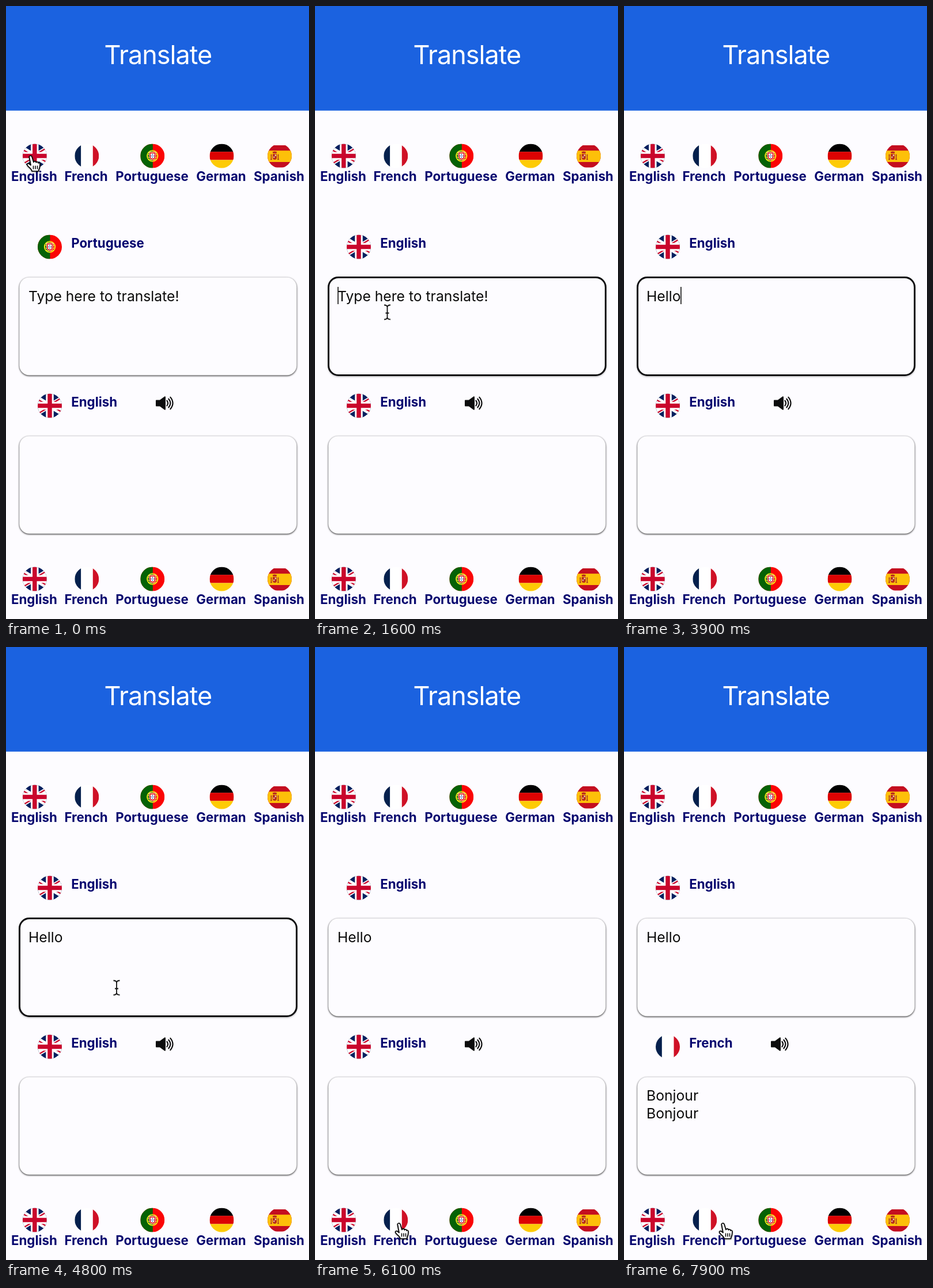
These frames come from a looping animation (526 px wide and 1065 px high, 8 s). An HTML page:

```html
<!DOCTYPE html>
<html lang="en">
<head>
<meta charset="utf-8">
<title>Translate</title>
<style>
  html, body { margin: 0; width: 100%; height: 100%; overflow: hidden; background: #fdfcff; }
  svg { display: block; width: 526px; height: 1065px; font-family: Inter, "Open Sans", sans-serif; }
  .title { font-size: 45px; letter-spacing: -1px; fill: #fff; }
  .label { font-size: 22.3px; font-weight: 700; fill: #06066f; }
  .body { font-size: 24.7px; fill: #0b0b0b; }
  .box { fill: #fdfcff; filter: drop-shadow(0 1.1px 1.4px rgba(0, 0, 0, .9)); }
  .ring { fill: #fdfcff; stroke: #0d0d0f; stroke-width: 3; filter: drop-shadow(0 2px 1px rgba(0, 0, 0, .18)); }
</style>
</head>
<body>
<svg viewBox="0 0 526 1065">
  <defs>
    <clipPath id="disc"><circle r="21"/></clipPath>
    <clipPath id="flat"><path d="M-21-18.500H21V20H-21Z"/></clipPath>

    <g id="English" clip-path="url(#disc)">
      <path fill="#04205f" d="M-21-21h42v42h-42z"/>
      <path stroke="#fff" stroke-width="8.500" d="M-35-21 35 21M-35 21 35-21"/>
      <path stroke="#c9062c" stroke-width="2.400" d="M-35-19.500 0 1.500M35 19.500 0-1.500M-35 22.500 0 1.500M35-22.500 0-1.500"/>
      <path stroke="#fff" stroke-width="13.500" d="M0-21V21M-21 0H21"/>
      <path stroke="#c9062c" stroke-width="7.500" d="M0-21V21M-21 0H21"/>
    </g>
    <g id="French" clip-path="url(#disc)">
      <path fill="#fff" d="M-21-21h42v42h-42z"/>
      <path fill="#05204d" d="M-21-21h10.800v42h-10.800z"/>
      <path fill="#cf1126" d="M10.500-21h10.500v42h-10.500z"/>
    </g>
    <g id="Portuguese" clip-path="url(#disc)">
      <path fill="#fb0405" d="M-21-21h42v42h-42z"/>
      <path fill="#056205" d="M-21-21h21.500v42h-21.500z"/>
      <g fill="none" stroke="#f4e51c" stroke-width="1.200">
        <circle r="9.300" stroke-width="1.700"/>
        <ellipse rx="9" ry="3.800"/>
        <path d="M-8-5Q0-9 8-5M-8 5Q0 9 8 5"/>
      </g>
      <path fill="#e31318" stroke="#fff" stroke-width=".8" d="M-5.500-6.500h11v7.500a5.500 5.800 0 0 1-11 0z"/>
      <path fill="#fff" d="M-3.400-4.200h6.800v5a3.400 3.600 0 0 1-6.800 0z"/>
      <path stroke="#143f9a" stroke-width="1.400" d="M0-3.300v1.500M0-.7v1.500M0 2v1.500M-2.400-.7v1.500M2.400-.7v1.500"/>
    </g>
    <g id="German" clip-path="url(#disc)">
      <path d="M-21-21h42v14h-42z"/>
      <path fill="#dc0303" d="M-21-7.200h42v14.200h-42z"/>
      <path fill="#fdcb05" d="M-21 6.900h42v14.500h-42z"/>
    </g>
    <g id="Spanish" clip-path="url(#disc)">
      <g clip-path="url(#flat)">
        <path fill="#c40e20" d="M-21-21h42v42h-42z"/>
        <path fill="#fdc009" d="M-21-9.300h42v19.800h-42z"/>
        <path stroke="#ad3b20" stroke-width="1.600" d="M-14.500-3v9M-2.500-3v9M-16 6h3M-4 6h3M-15.500-1h2M-3.500-1h2"/>
        <path fill="#b92c1d" d="M-12-3.500h7v6.500a3.500 3.500 0 0 1-7 0zM-11.500-4.500l-.8-2.500 3.800-1 3.800 1-.8 2.500z"/>
        <path fill="#e8c9a9" d="M-8.200-2.500h2.300v2.800h-2.300zM-11 1h2.300v2.300h-2.300z"/>
      </g>
    </g>

    <g id="speaker">
      <path fill="#0c0c0d" d="M0 7.500Q0 6.500 1 6.500H7L15.500 .3Q17 0 17 1.500V22.500Q17 24 15.500 23.700L7 17.500H1Q0 17.500 0 16.500Z"/>
      <path fill="none" stroke="#0c0c0d" stroke-width="2.100" stroke-linecap="round" d="M19.300 7.500Q23 12 19.300 16.500M22.300 4.500Q28.500 12 22.300 19.500M25.300 1.700Q33.800 12 25.300 22.300"/>
    </g>

    <g id="hand" style="filter:drop-shadow(0 1.500px 1px rgba(0,0,0,.4))">
      <path fill="#fff" stroke="#000" stroke-width="1.700" stroke-linejoin="round" d="M-2.500 1C-3.500-2 1-3 2 0L5 9.500C5.500 7 9 7 9.200 10C10 8 13 8.500 13 11C14 9.700 16.300 10.500 16 13.500L15.500 18C15 21 13.500 22 13.500 25H2C1.500 21-3 19-5.500 15.500C-8 12.500-5 10.500-2.500 12.500L0 14.500Z"/>
      <path stroke="#000" stroke-width="1.500" d="M4.500 15.500v6M8 15.500v6M11.500 15.500v6"/>
    </g>
    <path id="beam" fill="none" stroke="#111" stroke-width="1.800" d="M-5.500-12.500Q0-12.500 0-8.500Q0-12.500 5.500-12.500M0-9V9M-5.500 12.500Q0 12.500 0 8.500Q0 12.500 5.500 12.500M-3 1.500H3"/>
    <path id="arrow" stroke="#fff" stroke-width="1.600" d="M0 0V21L5 16.500L8.500 24.500L12 23L8.500 15.300H15Z"/>
  </defs>

  <path fill="#fdfcff" d="M0 0h526v1065H0z"/>
  <path fill="#1b62e0" d="M0 0h526v181.700H0z"/>
  <text class="title" x="170.500" y="100.500">Translate</text>
  <g id="rows"></g>

  <use id="fromFlag" x="76" y="418.500"/>
  <text id="fromName" class="label" x="113.200" y="419.500"></text>
  <rect id="idle" class="box" x="23.300" y="471.500" width="481.200" height="170" rx="17"/>
  <rect id="focus" class="ring" x="23.500" y="471.500" width="481" height="170" rx="17"/>
  <text id="input" class="body" x="39" y="512.500"></text>
  <path id="caret" stroke="#111" stroke-width="1.600" d="M0 488V518"/>

  <use id="toFlag" x="76" y="694.500"/>
  <text id="toName" class="label" x="113.200" y="695.500"></text>
  <use id="sound" href="#speaker" y="678"/>
  <rect class="box" x="23.300" y="747.300" width="481.200" height="169.500" rx="17"/>
  <text id="out1" class="body" x="39" y="788"></text>
  <text id="out2" class="body" x="39" y="818.500"></text>

  <use id="pointer"/>
</svg>
<script>
const $ = id => document.getElementById(id);
const LOOP = 8000, STEP = 100;
const FOCUS = 1400, BLUR = 5900;

// name, flag centre, label start
const langs = [
  ["English", 49.800, 8.900], ["French", 140.300, 101.400], ["Portuguese", 254.300, 190.200],
  ["German", 374.500, 330.300], ["Spanish", 475, 429.900]
];
$("rows").innerHTML = [0, 735].map(dy => langs.map(([name, cx, tx]) =>
  `<use href="#${name}" x="${cx}" y="${260.5 + dy}"/>` +
  `<text class="label" x="${tx}" y="${303.5 + dy}">${name}</text>`).join("")).join("");

// time, x, y of the pointer hot spot
const path = [
  [0, 43, 262], [300, 45, 263], [600, 53, 271], [900, 65, 283], [1100, 80, 350],
  [1300, 119, 505], [1500, 125.500, 532], [1700, 125.500, 532], [2200, 150, 560],
  [2800, 184, 588], [4500, 184, 588], [4800, 192, 592], [5000, 188, 690],
  [5200, 174, 900], [5400, 160, 1038], [5600, 152, 1032], [5900, 146, 1003],
  [6700, 146, 1003], [7300, 160, 1002], [7700, 172, 1003], [8000, 172, 1003]
];
const keys = [2900, 3200, 3400, 3600, 3900];

function pointerAt(t) {
  const i = Math.max(1, path.findIndex(p => p[0] >= t));
  const [t0, x0, y0] = path[i - 1], [t1, x1, y1] = path[i];
  const k = (t - t0) / (t1 - t0);
  return [x0 + (x1 - x0) * k, y0 + (y1 - y0) * k];
}

function pointerKind(y) {
  if (y > 470 && y < 643 || y > 746 && y < 918) return "beam";
  return y > 239 && y < 310 || y > 972 && y < 1045 ? "hand" : "arrow";
}

const text = (id, s) => { $(id).textContent = s; };
const show = (id, on) => $(id).setAttribute("visibility", on ? "visible" : "hidden");

function draw(t) {
  const from = t < 200 ? "Portuguese" : "English";
  const to = t < 6400 ? "English" : "French";
  $("fromFlag").setAttribute("href", "#" + from);
  $("toFlag").setAttribute("href", "#" + to);
  text("fromName", from);
  text("toName", to);
  $("sound").setAttribute("x", to === "French" ? 255 : 260);

  const typed = "Hello".slice(0, keys.filter(k => k <= t).length);
  text("input", typed || "Type here to translate!");
  text("out1", t >= 6700 ? "Bonjour" : "");
  text("out2", t >= 7300 ? "Bonjour" : "");

  const focused = t >= FOCUS && t < BLUR;
  show("focus", focused);
  show("idle", !focused);
  const lastKey = keys.filter(k => k <= t).pop() || FOCUS;
  show("caret", focused && (t - lastKey) % 1000 < 500);
  const caretX = typed ? 39.4 + $("input").getComputedTextLength() : 40;
  $("caret").setAttribute("transform", `translate(${caretX})`);

  const [x, y] = pointerAt(t);
  $("pointer").setAttribute("href", "#" + pointerKind(y));
  $("pointer").setAttribute("transform", `translate(${x} ${y})`);
  show("pointer", t < keys[0] || t >= 4500);
}

const start = performance.now();
let last = -1;
function tick() {
  const t = Math.floor((performance.now() - start) % LOOP / STEP) * STEP;
  if (t !== last) draw(last = t);
  requestAnimationFrame(tick);
}
tick();
</script>
</body>
</html>
```
